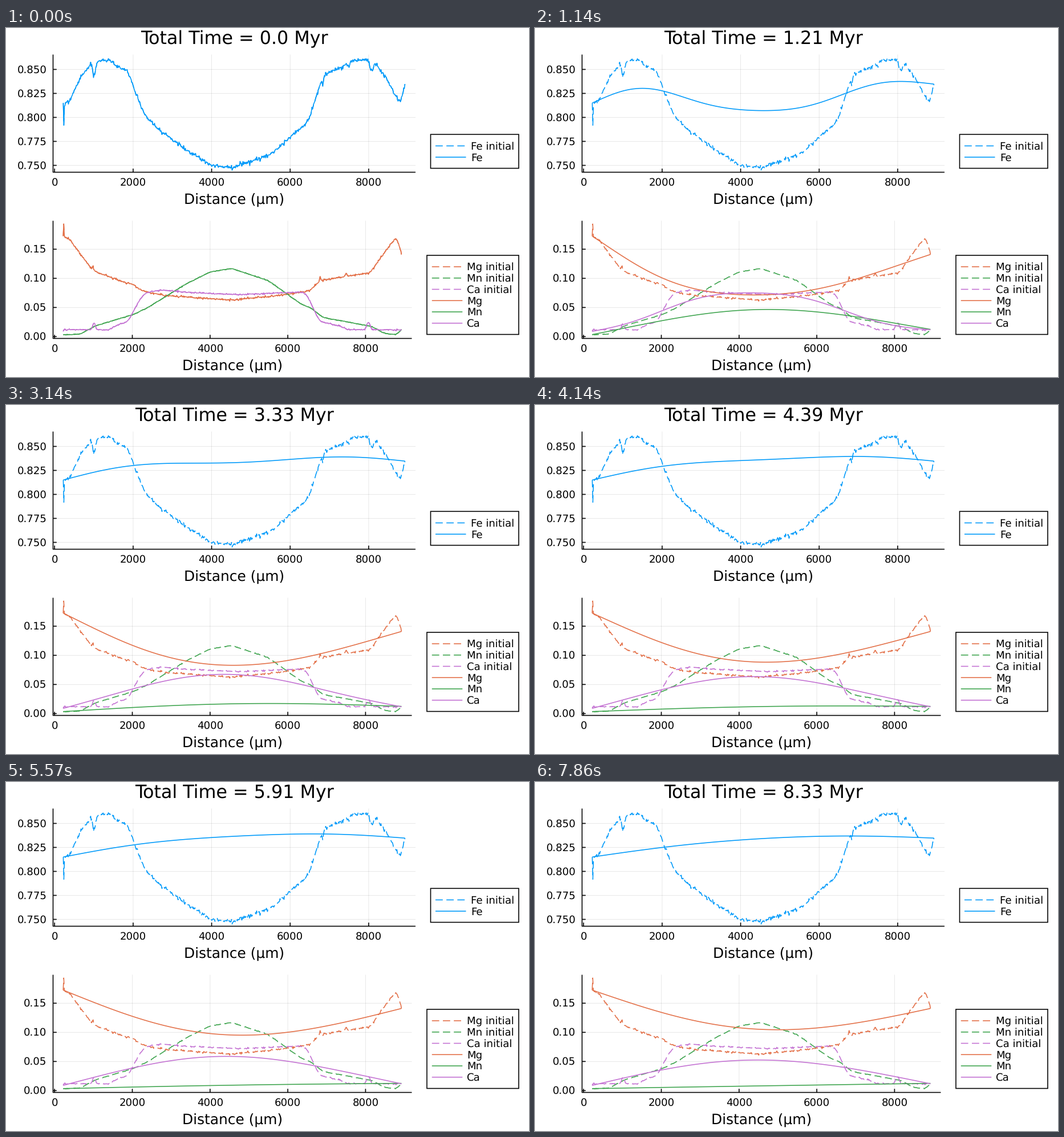
These frames come from a looping animation (917 px wide and 611 px high, 8000 ms). A matplotlib script:

```python
import numpy as np
import matplotlib.pyplot as plt
from matplotlib.animation import FuncAnimation
from matplotlib.patches import Rectangle

W, H, DPI = 917, 611, 64          # stage in pixels
PT = 72 / DPI                     # points per pixel
FRAMES, TICK = 200, 40            # one loop of 8 s
STATES, RATE = 56, 7              # shown states, states per second
STEP = 10 / 66                    # Myr per state
X0, X1 = 221, 8923                # ends of the profile, in µm
TEXT, LABEL, TITLE = 18.1, 24.9, 31.7

plt.rcParams["font.family"] = "DejaVu Sans"
plt.rcParams["text.hinting"] = "none"
plt.rcParams["path.snap"] = False

COLORS = {"Fe": "#009afa", "Mg": "#e36f47", "Mn": "#3ea44e", "Ca": "#c371d2"}
MINOR = ["Mg", "Mn", "Ca"]

# Trend: distance in mm and fraction in percent at a few bends
TREND = {
    "Mg": [(.22, 17.25), (.36, 16.9), (.95, 11.65), (1.1, 11), (1.7, 9.55),
           (2.06, 8.85), (2.25, 7.85), (2.8, 7.1), (4.5, 6.28), (5.7, 7),
           (6.55, 7.85), (6.85, 9.65), (8.12, 11), (8.8, 17.3), (8.92, 14.1)],
    "Mn": [(.22, .33), (.65, .4), (1.05, 1.85), (2.05, 3.85), (2.4, 5),
           (3.4, 9.1), (4, 11.1), (4.55, 11.7), (5.5, 9.6), (6.35, 5.55),
           (6.6, 4.9), (6.9, 3.3), (8.15, 1.75), (8.5, .55), (8.8, .3), (8.92, 1.25)],
    "Ca": [(.22, 1.2), (1.4, 1.15), (1.62, 2), (1.89, 2.6), (2.2, 6.5),
           (2.35, 7.55), (2.74, 8), (3.5, 7.55), (4.7, 7.2), (6.35, 7.65),
           (6.48, 7.3), (6.82, 2.6), (7.3, 1.9), (7.55, 1.2), (8.92, 1.18)],
}
# Local peaks: centre in µm, height, width in µm
PEAKS = {
    "Mg": [(236, .021, 9), (985, .006, 15), (6830, .006, 25), (7500, .005, 30)],
    "Mn": [],
    "Ca": [(1015, .0115, 50), (8075, .0125, 60)],
}
NOISE = {"Mg": .0006, "Mn": .0002, "Ca": .0004}
ENDS = {"Mg": (.1725, .1410), "Mn": (.0035, .0125), "Ca": (.0090, .0118)}


class Panel:
    """Maps data to stage pixels and draws the axes."""

    def __init__(self, box, kx, y_ref, ky):
        self.left, self.top, self.right, self.bottom = box
        self.kx, self.y_ref, self.ky = kx, y_ref, ky

    def px(self, x):
        return 85.2 + self.kx * np.asarray(x)

    def py(self, v):
        return self.y_ref[1] - self.ky * (np.asarray(v) - self.y_ref[0])

    def draw(self, ticks, fmt):
        for x in range(0, 8001, 2000):
            p = self.px(x)
            stroke([p, p], [self.top, self.bottom], "black", 0.9, alpha=0.1)
            stroke([p, p], [self.bottom, self.bottom - 6.3], "black")
            label(p, self.bottom + 23.4, str(x), TEXT, "center")
        for v in ticks:
            p = self.py(v)
            stroke([self.left, self.right], [p, p], "black", 0.9, alpha=0.1)
            stroke([self.left, self.left + 6.3], [p, p], "black")
            label(71.5, p + 5.8, fmt % v, TEXT, "right")
        stroke([self.left, self.left, self.right],
               [self.top, self.bottom, self.bottom], "black")
        label((self.left + self.right) / 2, self.bottom + 55.3,
              "Distance (µm)", LABEL, "center")


def stroke(x, y, color, width=1.6, dashed=False, **kw):
    style = (0, (8, 4)) if dashed else "-"
    return ax.plot(x, y, color=color, lw=width * PT, ls=style,
                   solid_capstyle="butt", **kw)[0]


def label(x, y, text, size, align):
    return ax.text(x, y, text, fontsize=size * PT, ha=align, va="baseline")


def legend(box, names, line_x, text_x, first):
    x, y, w, h = box
    ax.add_patch(Rectangle((x, y), w, h, fc="white", ec="black",
                           lw=1.6 * PT, zorder=4))
    rows = [(n, " initial") for n in names] + [(n, "") for n in names]
    for i, (name, suffix) in enumerate(rows):
        p = first + 19.75 * i
        stroke([line_x, line_x + 53.5], [p, p], COLORS[name],
               dashed=bool(suffix), zorder=5)
        label(text_x, p + 6.2, name + suffix, TEXT, "left").set_zorder(5)


def trend(name, x):
    """Bends joined by straight runs, with rounded corners."""
    bx, bv = np.array(TREND[name]).T
    offsets = np.linspace(-2, 2, 9)
    weights = np.exp(-offsets ** 2 / 2)
    runs = [np.interp(x + 50 * o, bx * 1000, bv / 100) for o in offsets]
    return weights @ np.array(runs) / weights.sum()


def profile(name, x):
    v = trend(name, x)
    for centre, height, width in PEAKS[name]:
        v += height * np.exp(-((x - centre) / width) ** 2)
    v[0], v[-1] = ENDS[name]
    return v


def measured(name, x):
    scale = NOISE[name]
    noise = rng.laplace(0, scale, x.size).clip(-4 * scale, 4 * scale)
    noise[[0, -1]] = 0
    return profile(name, x) + noise


def diffusivity(d0, energy, volume):
    """Tracer diffusivity in µm²/Myr at 900 °C and 0.6 GPa."""
    rt = 1.9872 * 1173.15
    return d0 * 1e8 * 3.15576e13 * np.exp(-(energy + 600 * volume / 4.184) / rt)


def diffuse(c, count, substeps=300):
    """Coupled Mg-Mn-Ca diffusion, Fe dependent, with fixed ends."""
    d_fe = diffusivity(6.4e-4, 65824, 5.6)
    d = np.array([diffusivity(1.1e-3, 67997, 5.3),
                  diffusivity(5.1e-4, 60569, 6.0), 0.5 * d_fe])
    excess, dcol = d - d_fe, d[:, None]
    dx = (X1 - X0) / (c.shape[1] - 1)
    k = STEP / substeps / dx ** 2
    states = [c.copy()]
    for _ in range(count - 1):
        for _ in range(substeps):
            grad = c[:, 1:] - c[:, :-1]
            mid = (c[:, 1:] + c[:, :-1]) / 2
            pull = (excess @ grad) / (d_fe + excess @ mid)
            flux = dcol * (grad - mid * pull)
            c[:, 1:-1] += k * (flux[:, 1:] - flux[:, :-1])
        states.append(c.copy())
    return states


def to_pixels(x, c):
    """Fe on the upper panel, the other elements on the lower one."""
    fe = (upper.px(x), upper.py(1 - c.sum(axis=0)))
    return [fe] + [(lower.px(x), lower.py(row)) for row in c]


fig = plt.figure(figsize=(W / DPI, H / DPI), dpi=DPI, facecolor="white")
ax = fig.add_axes([0, 0, 1, 1])
ax.set_xlim(0, W)
ax.set_ylim(H, 0)
ax.axis("off")

upper = Panel((82.5, 46.5, 718, 252.5), 0.06884, (0.8, 156.5), 1680)
lower = Panel((82.5, 337.5, 711.5, 543.5), 0.06815, (0, 540.3), 1020)
upper.draw([0.75, 0.775, 0.8, 0.825, 0.85], "%.3f")
lower.draw([0, 0.05, 0.1, 0.15], "%.2f")
title = label(400.2, 27.5, "", TITLE, "center")
legend((744.5, 186.3, 154.5, 59.3), ["Fe"], 753, 814.8, 206.4)
legend((738, 398, 161, 138.5), MINOR, 746.8, 808.4, 418)

rng = np.random.default_rng(5)
fine = np.linspace(X0, X1, 600)
grid = np.linspace(X0, X1, 110)
raw = to_pixels(fine, np.array([measured(n, fine) for n in MINOR]))
states = diffuse(np.array([profile(n, grid) for n in MINOR]), STATES)

for (x, y), color in zip(raw, COLORS.values()):
    stroke(x, y, color, dashed=True, zorder=2.5)
curves = [stroke([], [], color, zorder=3) for color in COLORS.values()]


def draw(frame):
    # a state appears in the tick that contains its start
    n = int((frame * TICK + TICK - 5) * RATE / 1000)
    title.set_text(f"Total Time = {round(n * STEP, 2)} Myr")
    shapes = to_pixels(grid, states[n]) if n else raw
    for curve, (x, y) in zip(curves, shapes):
        curve.set_data(x, y)
    return [title, *curves]


anim = FuncAnimation(fig, draw, frames=FRAMES, interval=TICK,
                     repeat=True, repeat_delay=0, blit=False)
plt.show()
```
